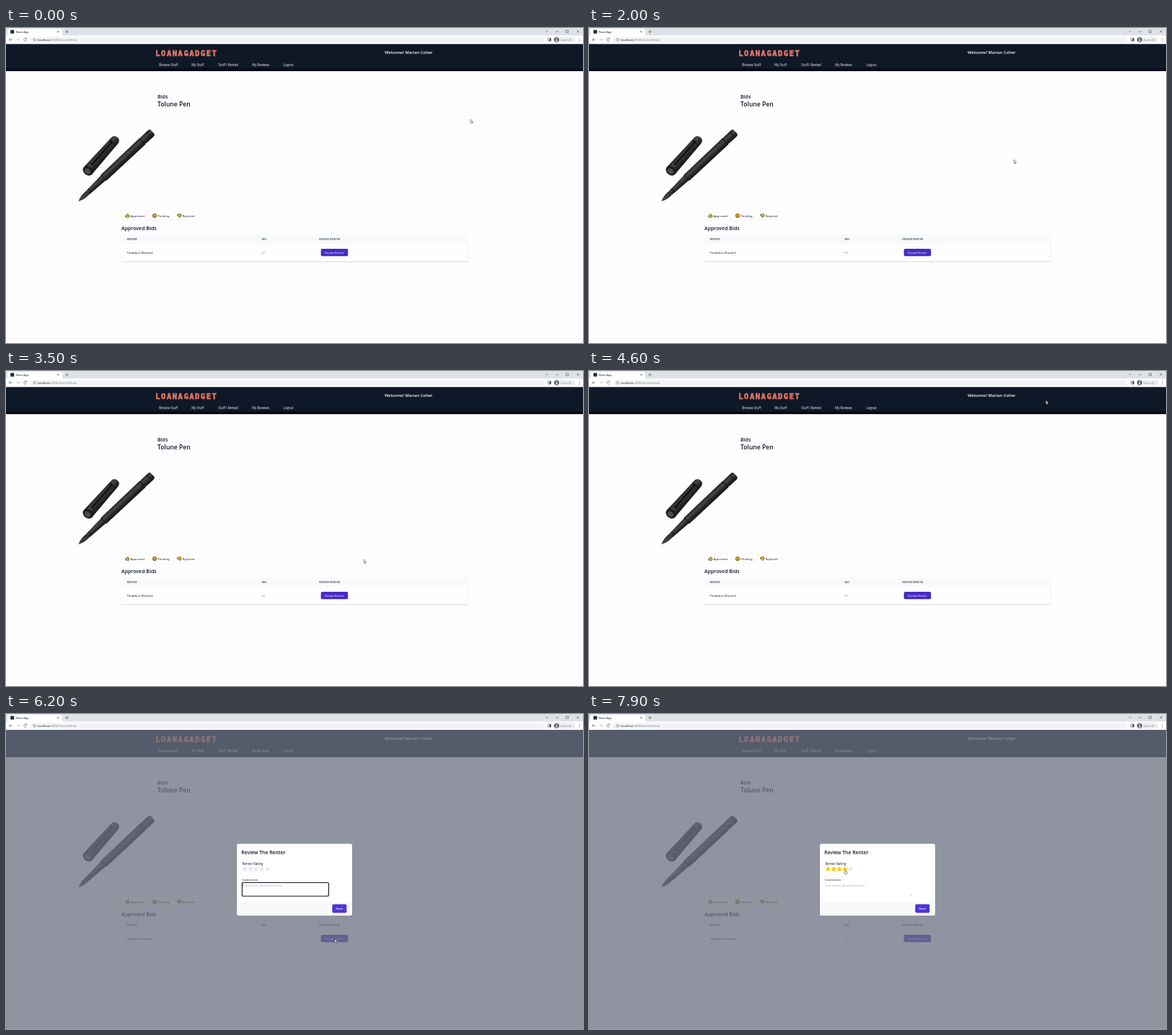
Animation, 800 px wide and 438 px high, one loop 8 s. Source, as an HTML page:

```html
<!DOCTYPE html>
<html lang="en">
<head>
<meta charset="utf-8">
<title>React App</title>
<style>
html, body { margin: 0; width: 100%; height: 100%; overflow: hidden; background: #fefdff; }
svg { display: block; width: 100vw; height: 100vh; }
text { font-family: "Open Sans", "Noto Sans", sans-serif; font-size: 4.3px; font-weight: 500; fill: #0f172a; white-space: pre; }
.nav text { fill: #fff; font-size: 4.4px; }
.title { font-size: 7px; font-weight: 600; }
.th text { font-size: 3.8px; font-weight: 600; fill: #374151; }
.line { fill: none; stroke: #5f6368; stroke-width: .7; }
.grey { fill: #777b82; }
</style>
</head>
<body>
<svg viewBox="0 0 800 438">
  <defs>
    <linearGradient id="metal" x1="0" y1="0" x2="0" y2="1">
      <stop offset="0" stop-color="#202022"/><stop offset=".35" stop-color="#48484a"/>
      <stop offset=".6" stop-color="#2b2b2d"/><stop offset="1" stop-color="#151517"/>
    </linearGradient>
    <path id="thumb" d="M-2.6-.2-.9-.4.2-2.6q1.2-.2.9 1.9h1.3q.6.5.2 1.6L2.1 2.3H-.8L-2.6 1.9Z" fill="#f9b81c" stroke="#30291c" stroke-width=".6" stroke-linejoin="round"/>
  </defs>

  <!-- browser -->
  <rect width="800" height="11" fill="#dee1e6"/>
  <rect y="10.5" width="800" height="12" fill="#fff"/>
  <path d="M0 11Q2 11 2 9V3Q2 1 4 1H76Q78 1 78 3V9Q78 11 80 11Z" fill="#fff"/>
  <rect x="6.2" y="2.7" width="5" height="5" fill="#20303a"/>
  <text x="13.5" y="6.8" style="font-size:3.85px;font-weight:400" fill="#45494d">React App</text>
  <path class="line" d="M71 3.8l2.6 2.6m0-2.6-2.6 2.6M82.2 5.1h4.4m-2.2-2.2v4.4M748.6 4l1.4 1.4L751.4 4M762.3 5h3.6M776.4 3.2h3.2v3.2h-3.2ZM791.4 3.2l3.2 3.2m0-3.2-3.2 3.2"/>
  <rect x="33" y="12.4" width="713" height="8.2" rx="4.1" fill="#f1f3f4"/>
  <path class="line" d="M8.7 16.2H4.6m2-2-2 2 2 2M28.7 15a2.1 2.1 0 1 0 .1 2m0-3.2V15.3h-1.6"/>
  <path class="line" d="M14.5 16.2h4.1m-2-2 2 2-2 2" style="stroke:#b5b8bc"/>
  <circle class="line" cx="39.6" cy="16.4" r="1.8" style="stroke-width:.5"/>
  <path class="line" d="M39.6 16v1.4" style="stroke-width:.5"/>
  <text x="44" y="17.9" style="font-size:4.2px;font-weight:400">localhost:<tspan class="grey">3000/items/3/bids</tspan></text>
  <path class="line" d="M751.6 14.2h3.8v3.9h-3.8Z"/>
  <rect x="753.5" y="14.2" width="2" height="4" fill="#404347"/>
  <rect x="758.5" y="12.3" width="31" height="8.2" rx="4.1" fill="#eceef0"/>
  <circle cx="763.4" cy="16.3" r="3.4" fill="#4d5156"/>
  <circle cx="763.4" cy="15.3" r="1.1" fill="#fff"/>
  <path d="M761.2 18.4q2.2-2.6 4.4 0Z" fill="#fff"/>
  <text x="769" y="17.6" class="grey" style="font-size:3.6px;font-weight:400">Guest (2)</text>
  <path d="M795 14.2v4.6" stroke="#5f6368" stroke-width=".9" stroke-dasharray=".9 .9"/>

  <!-- page -->
  <rect y="22.3" width="800" height="415.7" fill="#fefdff"/>
  <rect y="22.3" width="800" height="37.7" fill="#0f1827"/>
  <rect y="56.3" width="800" height="3.7" fill="#070c1a"/>
  <text x="207.3" y="39.2" style="font:bold 10.5px 'DejaVu Sans Mono',monospace;letter-spacing:1.5px;fill:#e4573f;stroke:#f6a08c;stroke-width:.5">LOANAGADGET</text>
  <g class="nav">
    <text x="525" y="36.1" style="font-size:5.75px;font-weight:600">Welcome! Marian Colter</text>
    <text x="212.3" y="52.5">Browse Stuff</text>
    <text x="257.3" y="52.5">My Stuff</text>
    <text x="294.3" y="52.5">Stuff I Rented</text>
    <text x="341.3" y="52.5">My Reviews</text>
    <text x="384.6" y="52.5">Logout</text>
  </g>
  <text x="210" y="98" class="title">Bids</text>
  <text x="210" y="109.2" class="title" style="font-size:8.6px">Tolune Pen</text>

  <!-- pen and its cap -->
  <g transform="translate(100.5 241) rotate(-43.3)">
    <path d="M0 0Q8-4.5 19-3.2V3.2Q8 4.5 0 0Z" fill="#343436"/>
    <path d="M1 0H15" stroke="#77777a" stroke-width=".5"/>
    <path d="M18-3.4 48-4.8V4.8L18 3.4Z" fill="url(#metal)"/>
    <path d="M48-5.6 122-6V6L48 5.6Z" fill="url(#metal)"/>
    <rect x="121" y="-5.8" width="20" height="11.6" rx="3.5" fill="url(#metal)"/>
    <path d="M22-3.4v6.8M48-5.4V5.4M121.5-6V6M135-5.6V5.6" stroke="#111113"/>
  </g>
  <g transform="translate(113.5 198.5) rotate(-48.5)">
    <path d="M0-7.6 56-6.3Q62-5.8 62 0T56 6.3L0 7.6Z" fill="url(#metal)"/>
    <ellipse rx="6" ry="7.6" fill="#1c1c1e"/>
    <ellipse cx="-.8" rx="3.6" ry="4.7" fill="#4a4a4c"/>
    <path d="M11-2H52" stroke="#0b0b0d" stroke-width="3.2" stroke-linecap="round"/>
    <path d="M11-2.8H50" stroke="#5b5b5e" stroke-width=".7"/>
    <path d="M52-6.4V6.4" stroke="#111113"/>
  </g>

  <!-- bid tabs -->
  <path d="M160.3 255.3H267.5V267H160.3ZM197.5 255.3V267M232.5 255.3V267" fill="#fff" stroke="#f1f1f5" stroke-width=".6"/>
  <use href="#thumb" x="168.3" y="261"/>
  <use href="#thumb" transform="translate(240.3 261) scale(1 -1)"/>
  <circle cx="206" cy="261" r="2.7" fill="#f9b81c" stroke="#30291c" stroke-width=".6"/>
  <path d="M204.5 260.3h.9m1.2 0h.9M204.9 262.5q1.1-.9 2.2 0" fill="none" stroke="#30291c" stroke-width=".6"/>
  <text x="172.5" y="262.5">Approved</text>
  <text x="210.2" y="262.5">Pending</text>
  <text x="244.5" y="262.5">Rejected</text>

  <!-- table -->
  <text x="160" y="281.4" class="title">Approved Bids</text>
  <rect x="159.8" y="288" width="480.6" height="38" rx="2" fill="#ececf0"/>
  <rect x="160" y="287" width="480" height="38" rx="2" fill="#d9dade"/>
  <rect x="160" y="275" width="480" height="49.4" rx="2" fill="#fefdff"/>
  <text x="160" y="281.4" class="title">Approved Bids</text>
  <path d="M640.2 277V323" stroke="#efeff3" stroke-width=".5"/>
  <rect x="160" y="287" width="480" height="13" fill="#f8f9fb"/>
  <g class="th">
    <text x="167.5" y="294.8">RENTER</text>
    <text x="354.5" y="294.8">BID</text>
    <text x="434.3" y="294.8">REVIEW RENTER</text>
  </g>
  <text x="167.5" y="314" style="font-size:4.2px">Thaddeus Morwell</text>
  <text x="354.5" y="314" class="grey" style="font-weight:400">$1</text>
  <rect id="review" x="436.6" y="307" width="37.6" height="10.2" rx="2"/>
  <text x="442" y="313.7" style="font-size:4px;fill:#fff">Review Renter</text>

  <!-- review dialog -->
  <g id="dialog">
    <rect y="22.3" width="800" height="415.7" fill="#6b7280" opacity=".75"/>
    <rect x="319.5" y="181.5" width="161" height="100" rx="3" fill="#555b68" opacity=".35"/>
    <rect x="320" y="180.4" width="160" height="99.8" rx="2.5" fill="#fff"/>
    <path d="M320 261.2H480V277.7Q480 280.2 477.5 280.2H322.5Q320 280.2 320 277.7Z" fill="#f8f9fb"/>
    <text x="326.3" y="194.6" class="title" style="font-size:6.85px">Review The Renter</text>
    <text x="327.4" y="210.2" style="font-size:4.6px">Renter Rating</text>
    <g id="stars"></g>
    <text x="327.3" y="231.9">Comments</text>
    <path d="M327.3 253.4H447.5" stroke="#f0f0f3" stroke-width=".5"/>
    <text x="327.5" y="239.5" style="font-size:4.25px;font-weight:400;fill:#9da2ac">Comments about the renter</text>
    <path d="M444.8 252.6l2-2m-.8 2 .8-.8" stroke="#666" stroke-width=".5"/>
    <g id="focus">
      <rect x="327.4" y="234.5" width="120" height="18.7" rx="1" fill="none" stroke="#15181f" stroke-width="1.1"/>
      <path d="M328.3 236.3v3.9" stroke="#222" stroke-width=".4"/>
    </g>
    <rect x="452.3" y="264.6" width="20" height="11.9" rx="2" fill="#4f35d4"/>
    <text x="457.6" y="272.2" style="fill:#fff;font-weight:600">Save</text>
  </g>
  <path id="cursor" fill="#fff" stroke="#333" stroke-width=".5" stroke-linejoin="round"/>
</svg>
<script>
const $ = id => document.getElementById(id);
const LOOP = 8000, OPEN = 6200, CLICK = 7500;
const ARROW = 'M0 0V5L1.2 4 2 5.8 2.8 5.4 2 3.7H3.6Z';
const HAND = 'M-.5 .4Q0-.4.5.4V2.2L2.2 2.6Q2.7 3 2.5 4L2 5.6H-.7L-2 3.5Q-1.6 2.7-.5 3.5Z';
// time, x, y of the pointer tip
const track = [
  [0, 644, 127], [1700, 644, 127], [1900, 622, 148], [2300, 490, 288], [2500, 456, 315],
  [2600, 455, 316], [3200, 455, 316], [3500, 496, 262], [4100, 612, 109], [4400, 632, 52],
  [4600, 633.5, 41], [4700, 632, 44], [5000, 566, 109], [5500, 492, 246], [5800, 456, 328],
  [6000, 459, 315.5], [6100, 459, 315.5], [6200, 456, 313], [6400, 452, 307],
  [7000, 384, 237], [7300, 356, 217], [7900, 355.5, 217], [LOOP, 355.5, 217]
];

function starPath(cx, cy) {
  const points = Array.from({ length: 10 }, (_, i) => {
    const r = i % 2 ? 1.9 : 4.1, a = (i / 5 - .5) * Math.PI;
    return `${cx + r * Math.cos(a)} ${cy + r * Math.sin(a)}`;
  });
  return `<path d="M${points.join('L')}Z"/>`;
}
$('stars').innerHTML = [0, 1, 2, 3, 4].map(i => starPath(331.5 + i * 7.8, 215.7)).join('');
const stars = [...$('stars').children];

function pointerAt(t) {
  const i = track.findIndex(p => p[0] > t);
  const [t0, x0, y0] = track[i - 1], [t1, x1, y1] = track[i];
  const k = (t - t0) / (t1 - t0);
  return [x0 + (x1 - x0) * k, y0 + (y1 - y0) * k];
}

function draw(now) {
  const t = Math.floor(now % LOOP / 100) * 100;
  const [x, y] = pointerAt(t);
  const open = t >= OPEN;
  const overButton = !open && x > 436 && x < 475 && y > 306 && y < 317.5;
  const overStars = open && x > 327 && x < 367 && y > 211 && y < 220;
  const rating = t >= CLICK ? 4 : overStars ? Math.ceil((x - 327.6) / 7.8) : 0;
  $('review').setAttribute('fill', overButton ? '#3a2a96' : '#472bc4');
  $('dialog').style.display = open ? '' : 'none';
  $('focus').style.display = t < CLICK ? '' : 'none';
  stars.forEach((s, i) => s.setAttribute('fill', i < rating ? '#fcc803' : '#e4e5e9'));
  $('cursor').setAttribute('d', overButton || overStars ? HAND : ARROW);
  $('cursor').setAttribute('transform', `translate(${x} ${y})`);
  requestAnimationFrame(time => draw(time - start));
}
const start = performance.now();
draw(0);
</script>
</body>
</html>
```
